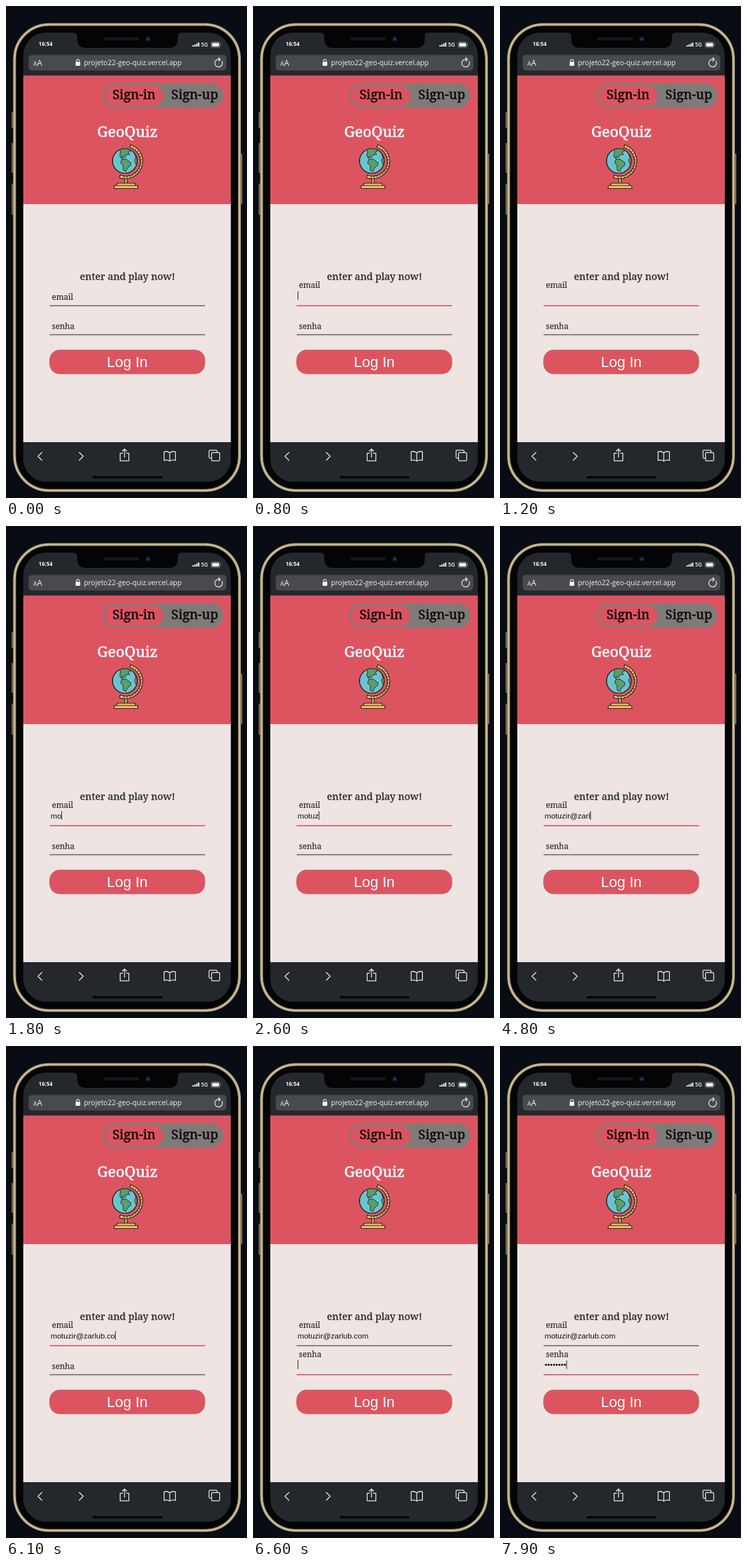
An HTML page that plays this animation: 362 by 740 pixels, repeating every 8000 ms.

```html
<!DOCTYPE html>
<html lang="en">
<head>
<meta charset="utf-8">
<title>GeoQuiz sign-in</title>
<style>
html, body { margin: 0; width: 100%; height: 100%; overflow: hidden; background: #080c14; }
svg { display: block; }
.slab { font-family: "Noto Serif", serif; }
.sans { font-family: "Liberation Sans", Arial, sans-serif; }
.ui { font-family: "Open Sans", "Noto Sans", sans-serif; fill: #f2f2f2; }
.tab { font-size: 19.5px; fill: #0d0809; stroke: #0d0809; stroke-width: .5; }
.label { font-size: 12px; fill: #332e2f; stroke: #332e2f; stroke-width: .2; }
.value { font-size: 11.6px; fill: #111; white-space: pre; }
.icon { fill: none; stroke: #e9eaec; stroke-width: 1.25; stroke-linecap: round; stroke-linejoin: round; }
.ink { stroke: #25282d; stroke-width: 1.2; stroke-linejoin: round; }
</style>
</head>
<body>
<svg width="362" height="740" viewBox="0 0 362 740">
  <defs>
    <clipPath id="screen"><rect x="26" y="40" width="311.7" height="675.5" rx="34"/></clipPath>
    <clipPath id="ball"><circle cx="178.5" cy="233" r="18.5"/></clipPath>
  </defs>
  <rect width="362" height="740" fill="#080c14"/>

  <!-- phone body -->
  <g fill="#7d6f50">
    <rect x="8.5" y="159" width="3" height="25" rx="1"/>
    <rect x="8.5" y="206" width="3" height="45" rx="1"/>
    <rect x="8.5" y="267" width="3" height="47" rx="1"/>
    <rect x="352" y="222" width="3" height="76" rx="1"/>
  </g>
  <rect x="10.5" y="25.5" width="342.5" height="705.5" rx="54" fill="#6b5f47"/>
  <rect x="13" y="28" width="337.5" height="700.5" rx="51.5" fill="#030406" stroke="#c8b78f" stroke-width="3.6"/>
  <rect x="15.3" y="30.3" width="332.9" height="695.9" rx="49" fill="none" stroke="#2a2419"/>

  <g clip-path="url(#screen)">
    <rect x="26" y="40" width="313" height="676" fill="#24272c"/>
    <rect x="26" y="104.5" width="313" height="194" fill="#dd5461"/>
    <rect x="26" y="298" width="313" height="358" fill="#eee5e3"/>
    <path d="M101 39H264V40Q258 40 258 46V50Q258 63 245 63H120Q107 63 107 50V46Q107 40 101 40Z" fill="#030406"/>
  </g>
  <rect x="146" y="47" width="54" height="4.5" rx="2.2" fill="#14161a"/>
  <circle cx="213" cy="49.5" r="4" fill="#11182c"/>
  <circle cx="213" cy="49.5" r="1.8" fill="#2a3d78"/>
  <rect x="130" y="707" width="105" height="3.5" rx="1.7" fill="#030406"/>

  <!-- status and address bars -->
  <text class="ui" x="49" y="60" font-size="8.2" font-weight="700">16:54</text>
  <g fill="#f2f2f2">
    <rect x="280" y="59" width="2" height="2"/><rect x="282.8" y="58" width="2" height="3"/>
    <rect x="285.6" y="56.5" width="2" height="4.5"/><rect x="288.4" y="55" width="2" height="6"/>
    <rect x="309.5" y="55.5" width="10.5" height="5.5" rx="1.2"/>
  </g>
  <text class="ui" x="293" y="61" font-size="8" font-weight="600">5G</text>
  <path d="M310 54.2H319.5Q321.2 54.2 321.2 56V60.5Q321.2 62.3 319.5 62.3H310Q308.2 62.3 308.2 60.5V56Q308.2 54.2 310 54.2ZM322.4 57V59.5" fill="none" stroke="#a5a7aa" stroke-width=".7"/>
  <rect x="34" y="73.5" width="297" height="23.5" rx="5" fill="#484a4d"/>
  <text class="ui" x="41" y="89.5" font-size="9">A<tspan font-size="12">A</tspan></text>
  <rect x="104.5" y="84" width="7" height="6" rx="1" fill="#f2f2f2"/>
  <path d="M106 84V82.3a2 2 0 0 1 4 0V84" fill="none" stroke="#f2f2f2" stroke-width="1.1"/>
  <text class="ui" x="117" y="89" font-size="10.6">projeto22-geo-quiz.vercel.app</text>
  <path class="icon" d="M324.4 83.3A5.7 5.7 0 1 1 319.5 80.2L321.8 80.4M319.5 77.8L322 80.4L319.5 82.8"/>

  <!-- header -->
  <rect x="145.5" y="116.5" width="181" height="36.5" rx="17.5" fill="#7e7b79"/>
  <rect x="148" y="119.5" width="88.5" height="31" rx="15" fill="#dd5461"/>
  <g class="slab" text-anchor="middle">
    <text class="tab" x="192.3" y="140.3">Sign-in</text>
    <text class="tab" x="283.5" y="140.3">Sign-up</text>
    <text x="182.3" y="197" font-size="22.5" fill="#fff" stroke="#fff" stroke-width=".6">GeoQuiz</text>
  </g>

  <!-- globe -->
  <g class="ink">
    <path d="M187.5 208.5A26.4 26.4 0 1 1 170.5 258.5L171.5 254A21.8 21.8 0 1 0 186 213Z" fill="#edbd60"/>
    <path id="ticks" stroke-width=".9"/>
    <path d="M178.5 259.5h3.5v8h-3.5z" fill="#edbd60"/>
    <path d="M166.5 266.5H194v3.5H166.5zM162.5 270H198v4.5H162.5z" fill="#edbd60"/>
    <circle cx="178.5" cy="233" r="18.5" fill="#6cc3cd"/>
    <g clip-path="url(#ball)" fill="#57a06a" stroke-width=".9">
      <path d="M171 215L183 213L187 218L183 220L186 223L180 224L178 228L174 226L175 231L171 226L172 220Z"/>
      <path d="M174 231L180 230L188 236L187 240L183 243L180 249L176 247V240L172 236Z"/>
      <path d="M192 219L199 224V236L195 238L193 232L195 228Z"/>
    </g>
    <circle cx="178.5" cy="233" r="18.5" fill="none"/>
  </g>

  <!-- form -->
  <text class="slab" x="182.5" y="411.5" font-size="14.9" text-anchor="middle" fill="#2b2728" stroke="#2b2728" stroke-width=".3">enter and play now!</text>
  <g id="fields"></g>
  <rect x="65.5" y="517.3" width="233.3" height="36" rx="15" fill="#dd5461" stroke="#c2686f" stroke-width=".8"/>
  <text class="sans" x="182.2" y="543" font-size="22" text-anchor="middle" fill="#fff">Log In</text>

  <!-- toolbar -->
  <g class="icon">
    <path d="M54 671.5L48 677.3L54 683.2M110 671.5L116 677.3L110 683.2"/>
    <path d="M175 672.5H171.5V684H184.5V672.5H181M178 678.5V666.5M174.8 669.5L178 666.3L181.2 669.5"/>
    <path d="M246 672Q242 669 237.5 670.5V683.5Q242 682 246 684.5Q250 682 254.5 683.5V670.5Q250 669 246 672ZV684"/>
    <path d="M308.5 680H306.5Q305 680 305 678.5V669.5Q305 668 306.5 668H315.5Q317 668 317 669.5V671.5"/>
    <rect x="308.7" y="671.7" width="12.3" height="12.3" rx="1.6"/>
  </g>
</svg>
<script>
const LOOP = 8000, FLOAT_MS = 200;
const NS = "http://www.w3.org/2000/svg";
const el = id => document.getElementById(id);

function add(parent, tag, attrs) {
  const node = document.createElementNS(NS, tag);
  for (const key in attrs) node.setAttribute(key, attrs[key]);
  return parent.appendChild(node);
}

function makeField(label, y, spec) {
  const g = el("fields");
  const field = {
    y, ...spec,
    label: add(g, "text", { class: "slab label", x: 69 }),
    value: add(g, "text", { class: "sans value", x: 67, y: y - 11 }),
    caret: add(g, "rect", { y: y - 21.5, width: 1, height: 13, fill: "#222" }),
    line: add(g, "rect", { x: 65.5, y: y - 0.6, width: 233.5, height: 1.6 })
  };
  field.label.textContent = label;
  return field;
}

// focus/blur and each keystroke, in ms
const fields = [
  makeField("email", 450.5, {
    text: "motuzir@zarlub.com", focus: 500, blur: 6400,
    keys: [1500, 1800, 2100, 2300, 2500, 2800, 3000, 3700, 4100, 4300,
           4500, 4800, 4900, 5200, 5600, 5800, 6000, 6200]
  }),
  makeField("senha", 494.2, {
    text: "•".repeat(8), focus: 6400, blur: LOOP,
    keys: [6800, 6900, 7200, 7300, 7500, 7600, 7800, 7900]
  })
];

function drawField(f, t) {
  const p = Math.min(1, Math.max(0, (t - f.focus) / FLOAT_MS));
  const ease = p * p * (3 - 2 * p);
  const count = f.keys.filter(k => k <= t).length;
  const focused = t >= f.focus && t < f.blur;
  const lit = count > 0 || (t - f.focus) % 1000 < 500;
  const text = f.text.slice(0, count);
  f.label.setAttribute("y", f.y - 8.5 - 18 * ease);
  if (f.value.textContent !== text) f.value.textContent = text;
  f.caret.setAttribute("x", 67 + (count ? f.value.getComputedTextLength() : 0));
  f.caret.setAttribute("visibility", focused && lit ? "visible" : "hidden");
  f.line.setAttribute("fill", focused ? "#d0525f" : "#766766");
}

// scale marks along the globe's arm
let ticks = "";
for (let deg = -60; deg <= 100; deg += 11) {
  const a = deg * Math.PI / 180, c = Math.cos(a), s = Math.sin(a);
  ticks += `M${179 + 22.8 * c} ${233.4 + 22.8 * s}L${179 + 25.6 * c} ${233.4 + 25.6 * s}`;
}
el("ticks").setAttribute("d", ticks);

function render(now) {
  const t = now % LOOP;
  fields.forEach(f => drawField(f, t));
}

let start;
function tick(now) {
  start ??= now;
  render(now - start);
  requestAnimationFrame(tick);
}
render(0);
requestAnimationFrame(tick);
</script>
</body>
</html>
```
